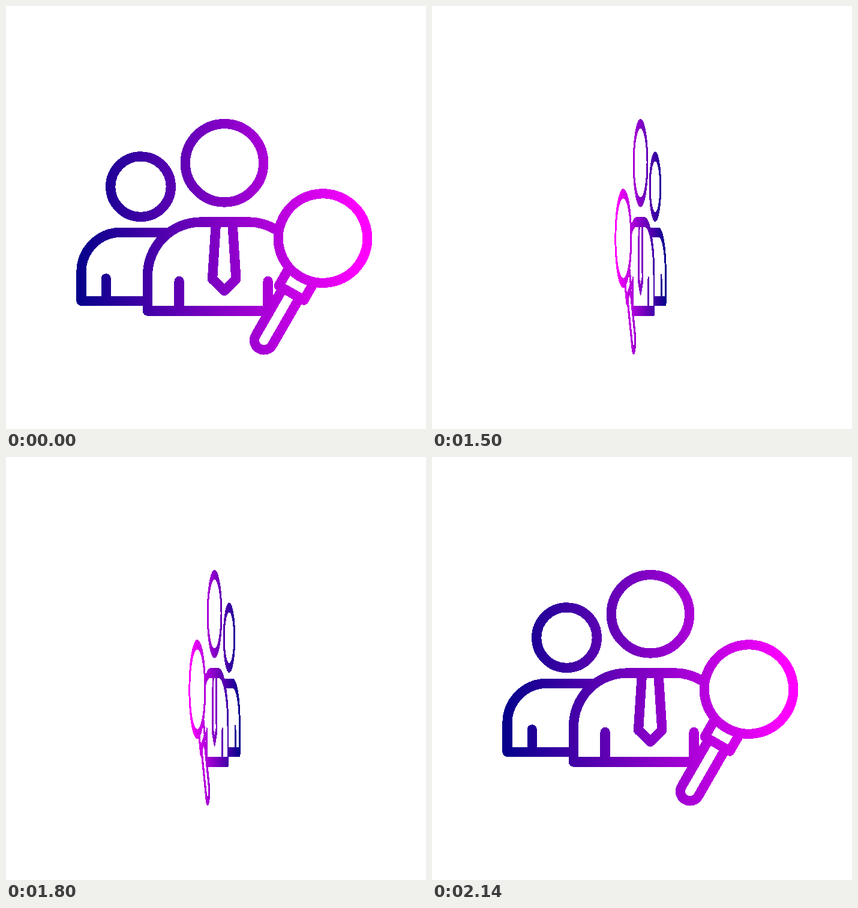
Write an HTML page that moves like this. It is 700x704 px and loops after 2980 ms.

```html
<!DOCTYPE html>
<html lang="en">
<head>
<meta charset="utf-8">
<title>People search icon</title>
<style>
  html, body { margin: 0; width: 100%; height: 100%; overflow: hidden; background: #fff; }
  svg { display: block; width: 700px; height: 704px; }
</style>
</head>
<body>
<svg viewBox="0 0 700 704" shape-rendering="crispEdges">
  <defs>
    <linearGradient id="ink" gradientUnits="userSpaceOnUse" x1="110" y1="0" x2="592" y2="0">
      <stop offset="0" stop-color="#000088"/>
      <stop offset="1" stop-color="#f0f"/>
    </linearGradient>
    <mask id="lines" maskUnits="userSpaceOnUse" x="0" y="0" width="700" height="704">
      <g fill="none" stroke="#fff" stroke-width="16.3" stroke-linejoin="round">
        <!-- person behind -->
        <circle cx="224.5" cy="300.7" r="50.3"/>
        <path d="M270 376.8H191.5A66 66 0 0 0 125.5 442.8V490.8H236"/>
        <path d="M166.7 490V453.5" stroke-linecap="round"/>
        <!-- person in front -->
        <circle cx="364" cy="261.3" r="65.2"/>
        <path d="M453 374.4A89 89 0 0 0 403 359.5H325A89 89 0 0 0 236 448.5V507.6H435"/>
        <path d="M288.6 507V458M436.6 500V458" stroke-linecap="round"/>
        <path d="M350 361L344 454.5L363.7 474L383.4 454.5L377.4 361"/>
        <!-- magnifier -->
        <g transform="translate(528 386.6) rotate(30)">
          <circle r="74.3"/>
          <path d="M-24 74V105H24V74"/>
          <path d="M-16 105V196A16 16 0 0 0 16 196V105"/>
        </g>
      </g>
    </mask>
  </defs>
  <g id="icon">
    <rect width="700" height="704" fill="url(#ink)" mask="url(#lines)"/>
  </g>
</svg>
<script>
  const LOOP = 2980, STEP = 20, AXIS = 350;
  const TURN_START = 1159, TURN_LENGTH = 982;
  const icon = document.getElementById('icon');

  const smoothstep = x => x * x * (3 - 2 * x);

  // One full turn about the vertical axis, easing in and out.
  function render(time) {
    const held = Math.floor(time / STEP) * STEP;
    const progress = Math.max(0, Math.min(1, (held - TURN_START) / TURN_LENGTH));
    const scale = Math.cos(2 * Math.PI * smoothstep(progress));
    icon.setAttribute('transform', `translate(${AXIS} 0) scale(${scale} 1) translate(${-AXIS} 0)`);
  }

  const start = performance.now();
  function tick() {
    render((performance.now() - start) % LOOP);
    requestAnimationFrame(tick);
  }
  tick();
</script>
</body>
</html>
```
